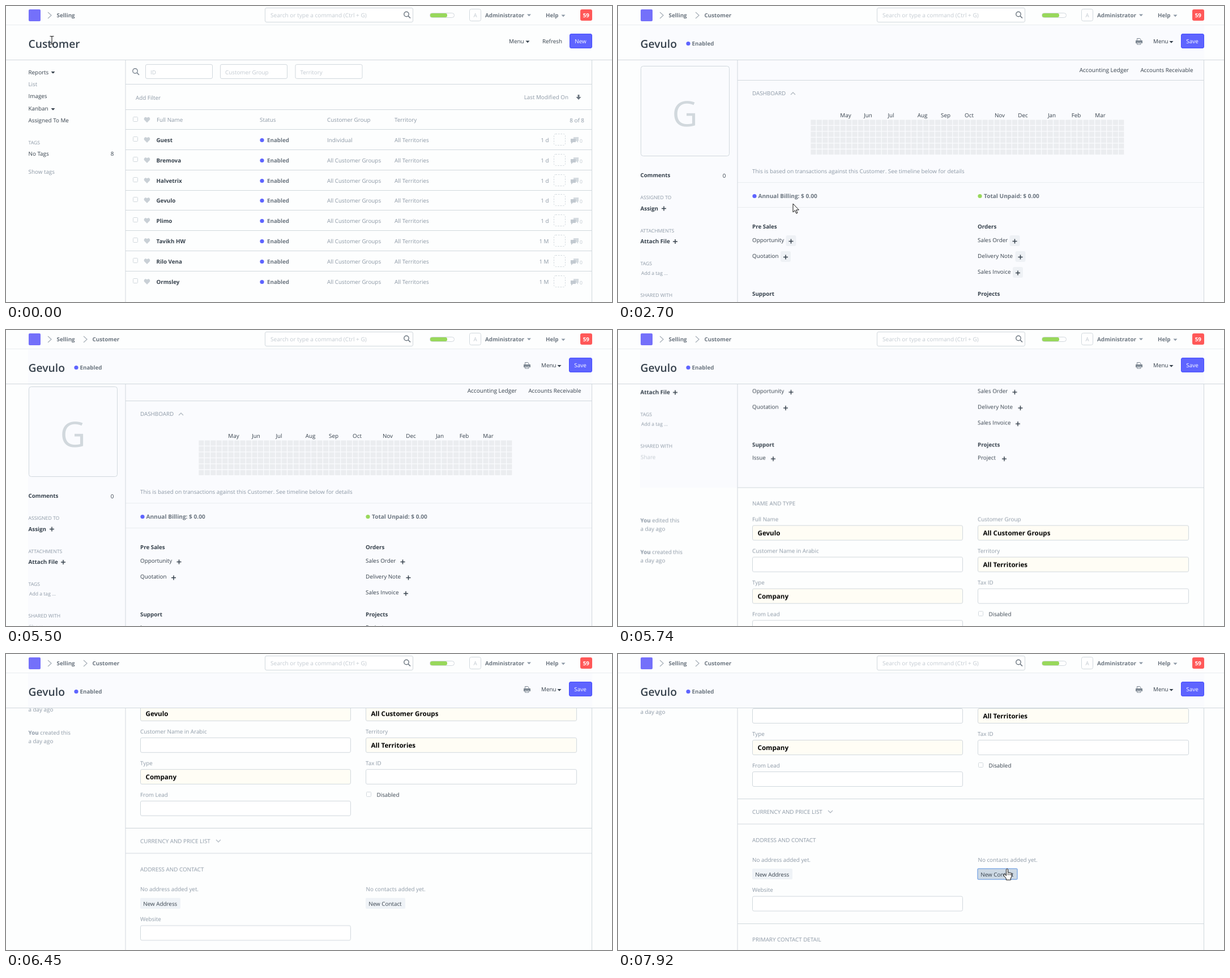
Animation, 1070 px wide and 524 px high, one loop 8 s. Source, as an HTML page:

```html
<!DOCTYPE html>
<html lang="en">
<head>
<meta charset="utf-8">
<title>Customer list</title>
<style>
html, body { margin: 0; width: 100%; height: 100%; overflow: hidden; background: #fdfefe; }
svg { display: block; width: 1070px; height: 524px; }
text { font: 9.85px "Open Sans", "Noto Sans", sans-serif; fill: #36414c; text-rendering: geometricPrecision; white-space: pre; }
.b { font-weight: 700; font-size: 9.8px; }
.m { fill: #8d99a6; }
.g { fill: #6c7680; }
.l { fill: #c3cad1; }
.w { fill: #fff; }
.s { font-size: 8.65px; }
.n { font-size: 10.1px; }
.v { font-weight: 700; font-size: 11.6px; fill: #000; }
.t { font-weight: 600; font-size: 19.3px; }
.big { font-size: 62px; fill: #d1d8dd; }
.mid { text-anchor: middle; }
.end { text-anchor: end; }

/* every timeline shares one 8 s loop */
.list, .form, .hover, .scroll, .plus, .over, .focus, .cursor, .beam, .arrow, .hand {
  animation: 8s step-end infinite;
}
.list { animation-name: list; }
.form { animation-name: form; }
.hover { animation-name: hover; }
.plus { animation-name: plus; }
.over { animation-name: over; }
.focus { animation-name: focus; }
.beam { animation-name: beam; }
.arrow { animation-name: arrow; }
.hand { animation-name: hand; }
.scroll { animation-name: scroll; animation-timing-function: linear; }
.cursor { animation-name: cursor; animation-timing-function: linear; }

@keyframes list { 0% { opacity: 1 } 33%, 100% { opacity: 0 } }
@keyframes form { 0% { opacity: 0 } 33%, 100% { opacity: 1 } }
@keyframes plus { 0% { opacity: 1 } 68.7%, 100% { opacity: 0 } }
@keyframes over { 0% { opacity: 0 } 94.2%, 100% { opacity: 1 } }
@keyframes focus { 0% { opacity: 0 } 98.95%, 100% { opacity: 1 } }
@keyframes hover {
  0% { opacity: 0; transform: translateY(0) }
  19.4% { opacity: 1; transform: translateY(0) }
  19.9% { opacity: 1; transform: translateY(36px) }
  20.4% { opacity: 1; transform: translateY(72px) }
  21.1%, 100% { opacity: 1; transform: translateY(107px) }
}
@keyframes scroll {
  0%, 68.7% { transform: translateY(0); animation-timing-function: step-start }
  68.75%, 68.85% { transform: translateY(-6px) }
  73.6% { transform: translateY(-496px) }
  74.6%, 74.9% { transform: translateY(-517px) }
  75.8%, 79.5% { transform: translateY(-525px) }
  81.6% { transform: translateY(-590px) }
  83.1%, 100% { transform: translateY(-612px) }
}
@keyframes cursor {
  0%, 5.36% { transform: translate(81px, 60px) }
  5.37%, 7.1% { transform: translate(102px, 65px) }
  9.6% { transform: translate(65px, 77px) }
  12.9%, 16.5% { transform: translate(112px, 67px); animation-timing-function: ease-in-out }
  22.1%, 39% { transform: translate(309px, 350px); animation-timing-function: ease-in-out }
  42.9% { transform: translate(1071px, 187px) }
  45.6% { transform: translate(1061px, 236px) }
  45.9%, 88.2% { transform: translate(1071px, 348px); animation-timing-function: ease-in-out }
  96.9%, 100% { transform: translate(687px, 380px) }
}
@keyframes beam { 0% { opacity: 1 } 17.8%, 100% { opacity: 0 } }
@keyframes arrow {
  0% { opacity: 0 } 17.8% { opacity: 1 } 19.4% { opacity: 0 }
  33% { opacity: 1 } 42.9% { opacity: 0 } 45.6% { opacity: 1 } 45.85% { opacity: 0 }
  88.3% { opacity: 1 } 94.2%, 100% { opacity: 0 }
}
@keyframes hand { 0% { opacity: 0 } 19.4% { opacity: 1 } 33% { opacity: 0 } 94.2%, 100% { opacity: 1 } }
</style>
</head>
<body>
<svg id="stage" viewBox="0 0 1070 524"></svg>
<script>
const BG = '#fdfefe', TINT = '#fafbfe', LINE = '#d1d8dd', SOFT = '#e9edf0';
const BLUE = '#5e64ff', GREEN = '#98d85b', DARK = '#36414c', GREY = '#8d99a6';

// y is the middle of the capitals
const text = (x, y, str, cls = '') => `<text x="${x}" y="${y + 3.6}" class="${cls}">${str}</text>`;
const heading = str => `<text x="39.5" y="74" class="t">${str}</text>`;
const rect = (x, y, w, h, fill, r = 0, more = '') =>
  `<rect x="${x}" y="${y}" width="${w}" height="${h}" rx="${r}" fill="${fill}" ${more}/>`;
const box = (x, y, w, h, fill = 'none', r = 2.5, more = '') =>
  rect(x + .5, y + .5, w - 1, h - 1, fill, r, `stroke="${LINE}" ${more}`);
const hline = (y, color = LINE, x = 211, w = 824) => rect(x, y, w, 1, color);
const dot = (x, y, color) => `<circle cx="${x}" cy="${y}" r="3.6" fill="${color}"/>`;
const path = (d, color, width = 1.4) =>
  `<path d="${d}" fill="none" stroke="${color}" stroke-width="${width}"/>`;
const shape = (d, fill, more = '') => `<path d="${d}" fill="${fill}" ${more}/>`;
const caret = (x, y, color = DARK) => shape(`M${x - 3.5} ${y - 1.5}h7l-3.5 3.7z`, color);
const cross = (x, y) => path(`M${x - 4} ${y}h8M${x} ${y - 4}v8`, DARK, 1.5);
const crumb = x => path(`M${x - 3} 11l6 5.5-6 5.5`, '#a9b2ba', 1.3);
const lens = (x, y, color) =>
  `<circle cx="${x - 1}" cy="${y - 1}" r="4.2" fill="none" stroke="${color}" stroke-width="1.4"/>` +
  path(`M${x + 2} ${y + 2}l4 4`, color, 1.7);
const heart = (x, y) =>
  shape(`M${x} ${y + 5}l-4.7-4.8c-2.2-3 1.8-7.2 4.7-3.6c2.9-3.6 6.9.6 4.7 3.6z`, '#c9d0d6');
const check = (x, y) => box(x - 5, y - 5, 9, 9, '#fff', 1);
const group = (cls, ...parts) => `<g class="${cls}">${parts.join('')}</g>`;
const each = (items, fn) => items.map(fn).join('');
const button = (x, w, label) =>
  rect(x + .5, 49.5, w, 25, BLUE, 2.5, 'stroke="#444bff"') + text(x + w / 2, 62.5, label, 'w mid');
const sides = () => rect(210.5, 95, 1, 429, LINE) + rect(1034, 95, 1, 429, LINE);

function navbar() {
  return rect(0, 0, 1070, 33, BG) + hline(33, SOFT, 0, 1070) +
    rect(40, 6, 21, 21, '#7470fa', 2) + crumb(77) + text(89.5, 16.5, 'Selling', 'b g') +
    box(457, 3, 262, 26, '#fff') + text(467, 16, 'Search or type a command (Ctrl + G)', 'l n') + lens(708, 15.5, '#6c7680') +
    box(748, 12, 44, 9, '#fff', 4) + rect(749, 13, 30, 7, GREEN, 3) +
    box(818, 5, 21, 22, '#fff', 3) + text(828.5, 16.5, 'A', 'l mid') +
    text(846, 16.5, 'Administrator', 'b g') + caret(923.5, 16, GREY) +
    text(953, 16.5, 'Help', 'b g') + caret(984, 17, GREY) +
    rect(1014, 6, 21, 20, '#ff5858', 3) + text(1024.3, 16, '59', 'b w mid');
}

function commentIcon(x, y) {
  return shape(`M${x + 5} ${y - 5}h9v7h-1v3l-3-3h-5z`, '#d5dbe0') +
    shape(`M${x} ${y - 2}h9v6h-5l-3 3v-3h-1z`, '#c3cad1');
}

function listRow([name, age], i) {
  const y = Math.round(237 + i * 35.8);
  return (i < 7 ? hline(y + 17) : '') + check(229, y - 1) + heart(249, y) +
    text(265.5, y, name, 'b') + dot(452, y + .5, BLUE) + text(461, y, 'Enabled', 'b g') +
    text(567, y, i ? 'All Customer Groups' : 'Individual', 'm') + text(686, y, 'All Territories', 'm') +
    text(958.5, y, age, 'm end') + box(967, y - 11, 21, 21, 'none', 3, 'stroke-dasharray="2.5 2"') +
    commentIcon(997, y) + text(1013, y + 1, '0', 'l s');
}

function listPage() {
  const rows = [['Guest', '1 d'], ['Bremova', '1 d'], ['Halvetrix', '1 d'], ['Gevulo', '1 d'],
    ['Plimo', '1 d'], ['Tavikh HW', '1 M'], ['Rilo Vena', '1 M'], ['Ormsley', '1 M']];
  const filters = [[246, 'ID'], [378, 'Customer Group'], [510.5, 'Territory']];
  return rect(0, 34, 1070, 490, BG) + rect(212, 219, 822, 35, '#f6fafd', 0, 'class="hover"') +
    heading('Customer') +
    text(888, 62.5, 'Menu') + caret(921, 63) + text(947, 62.5, 'Refresh') + button(995, 39, 'New') +
    hline(95, LINE, 0, 1070) + sides() +
    text(39.5, 117, 'Reports') + caret(83, 117.5) + text(39.5, 138, 'List', 'm') + text(39.5, 159, 'Images') +
    text(39.5, 181.5, 'Kanban') + caret(83, 182.5) + text(39.5, 202, 'Assigned To Me') +
    text(39.5, 241, 'TAGS', 'm s') + text(39.5, 261, 'No Tags') + text(190.5, 261, '8', 'end') +
    text(39.5, 293, 'Show tags', 'm') +
    lens(229, 116, '#7a8590') +
    each(filters, ([x, label]) => box(x, 103, 119, 26, '#fff') + text(x + 9, 117, label, 'l')) +
    each([138, 183, 218], y => hline(y)) +
    text(229, 162, 'Add Filter', 'm') + text(993, 161, 'Last Modified On', 'm end') +
    shape('M1009.5 157h3v4h3l-4.5 5-4.5-5h3z', '#6c7680') +
    check(229, 201) + heart(249, 201.5) +
    each([[266, 'Full Name'], [448, 'Status'], [567, 'Customer Group'], [686, 'Territory']],
      ([x, label]) => text(x, 201.5, label, 'm')) +
    text(1021, 202, '8 of 8', 'm end') + rows.map(listRow).join('');
}

function heatmap() {
  let d = '';
  for (let c = 0; c < 53; c++)
    for (let r = 0; r < 6; r++) d += `M${(340.3 + c * 10.46).toFixed(1)} ${(201.6 + r * 10.46).toFixed(1)}h9.2v9.2h-9.2z`;
  const months = [['May', 402], ['Jun', 441.5], ['Jul', 482], ['Aug', 537.5], ['Sep', 578.5], ['Oct', 620],
    ['Nov', 674], ['Dec', 715], ['Jan', 766], ['Feb', 809], ['Mar', 851.5]];
  return shape(d, '#ebedf0') + each(months, ([m, x]) => text(x, 193, m, 'mid'));
}

function link(x, y, label, px) {
  return text(x, y, label) + rect(px - 9, y - 8.5, 18, 19, '#eef1f5', 3, 'class="plus"') + cross(px, y + 2);
}

function dashboard() {
  return rect(39, 90, 996, 495, TINT) +
    text(902, 113.5, 'Accounting Ledger', 'n end') + text(1015.5, 113.5, 'Accounts Receivable', 'end') + hline(131) +
    text(237, 154.5, 'DASHBOARD', 'm') + path('M305 157l4-4 4 4', '#b4bcc4', 1.4) + heatmap() +
    text(237, 292.5, 'This is based on transactions against this Customer. See timeline below for details', 'm') +
    hline(312, SOFT) + dot(241, 336.5, BLUE) + text(247.5, 336, 'Annual Billing: $ 0.00', 'b n g') +
    dot(639, 336.5, GREEN) + text(646, 336, 'Total Unpaid: $ 0.00', 'b n g') + hline(356, SOFT) +
    text(237, 390, 'Pre Sales', 'b') + link(237, 414.5, 'Opportunity', 305.5) + link(237, 442.5, 'Quotation', 296) +
    text(635, 390, 'Orders', 'b') + link(635, 414.5, 'Sales Order', 700.5) +
    link(635, 442.5, 'Delivery Note', 710.5) + link(635, 470.5, 'Sales Invoice', 706) +
    text(237, 509, 'Support', 'b') + link(237, 532.5, 'Issue', 274) +
    text(635, 509, 'Projects', 'b') + link(635, 532.5, 'Project', 682) + hline(585);
}

function sidebar() {
  const log = (y, verb) => `<text x="39.5" y="${y + 3.6}" class="m"><tspan class="b">You</tspan> ${verb} this</text>` +
    text(39.5, y + 15, 'a day ago', 'm');
  return box(40, 106, 157, 160, 'none', 4) + `<text x="118" y="213" class="big mid">G</text>` +
    text(39.5, 299.5, 'Comments', 'b') + text(190.5, 300, '0', 'end') +
    text(39.5, 338.5, 'ASSIGNED TO', 'm s') + text(39.5, 358, 'Assign', 'b') + cross(81, 358.5) +
    text(39.5, 397, 'ATTACHMENTS', 'm s') + text(39.5, 416.5, 'Attach File', 'b') + cross(101, 417) +
    text(39.5, 455.5, 'TAGS', 'm s') + text(41, 472.5, 'Add a tag ...', 'm s') +
    text(39.5, 511.5, 'SHARED WITH', 'm s') + text(40, 531, 'Share', 'l') +
    log(643, 'edited') + log(699, 'created');
}

function field(x, y, label, value) {
  return text(x, y, label, 'm') + box(x, y + 11, x < 600 ? 372 : 373, 27, value ? '#fffdf5' : '#fff') +
    (value ? text(x + 9.5, y + 25.5, value, 'v') : '');
}

function details() {
  const chip = (x, w, fill, more) => rect(x, 992, w, 19, fill, 2, more);
  return text(237, 613, 'NAME AND TYPE', 'm') +
    field(237, 641, 'Full Name', 'Gevulo') + field(635, 641, 'Customer Group', 'All Customer Groups') +
    field(237, 697, 'Customer Name in Arabic') + field(635, 697, 'Territory', 'All Territories') +
    field(237, 753, 'Type', 'Company') + field(635, 753, 'Tax ID') +
    field(237, 809, 'From Lead') + check(641, 809) + text(654.5, 809.5, 'Disabled') +
    hline(868) + text(237, 891.5, 'CURRENCY AND PRICE LIST', 'm') + path('M371 889l4 4 4-4', '#b4bcc4') +
    hline(912.5) + text(237, 941, 'ADDRESS AND CONTACT', 'm') +
    text(237, 976, 'No address added yet.', 'm') + text(635.5, 976, 'No contacts added yet.', 'm') +
    chip(237, 71, '#eff3f7') + text(242.3, 1002, 'New Address') +
    chip(635, 70, '#eff3f7') + chip(635, 70, '#d3dde7', 'class="over"') +
    chip(635, 70, '#cdd9e4', 'stroke="#86aee6" stroke-width="1.5" class="focus"') +
    text(640.3, 1002, 'New Contact') +
    field(237, 1029.5, 'Website') + hline(1089) + text(237, 1117.5, 'PRIMARY CONTACT DETAIL', 'm');
}

function formPage() {
  return rect(0, 34, 1070, 490, BG) +
    group('scroll', dashboard(), sidebar(), details()) + sides() +
    rect(0, 34, 1070, 61, BG) + rect(39, 34, 996, 61, TINT) + hline(95, LINE, 0, 1070) +
    heading('Gevulo') + dot(124, 66.5, BLUE) + text(130.5, 66, 'Enabled', 'b g') +
    path('M916.500 61v-3.500h5l1.500 1.500v2M916.500 65.500h6.500v2.500h-6.500z', '#7a8590', 1) +
    shape('M914 61h12v5h-2v-1.500h-8v1.500h-2z', '#7a8590') +
    text(945, 62.5, 'Menu') + caret(977, 63.5) + button(994, 40, 'Save');
}

function cursor() {
  const edge = 'stroke="#111" stroke-width="1" stroke-linejoin="round"';
  return group('cursor',
    group('beam', path('M-3.5-6.5h2.5l1 1 1-1h2.5M0-5.5v12M-3.5 7.5h2.5l1-1 1 1h2.5', '#222', 1.1)),
    group('arrow', shape('M0 0v15l3.4-3.2 2.4 5.4 2.2-1-2.4-5.2h4.8z', '#fff', edge)),
    group('hand', shape('M-1.5 1.2q1.5-2 3 0v6q1.2-1.2 2.5 0q1.3-1 2.4.5q1.6-.6 1.6 1.3v5l-1.6 3v3h-8v-2.5l-4.5-6q-.6-2.2 1.7-1.7l2.9 2.5z', '#fff', edge) +
      path('M1.5 8v3.5M4 8.5v3M6.3 9v2.5', '#111', .8)));
}

document.getElementById('stage').innerHTML =
  group('list', listPage()) + group('form', formPage()) + navbar() +
  group('form', crumb(140), text(152.5, 16.5, 'Customer', 'b g')) + cursor();
</script>
</body>
</html>
```
